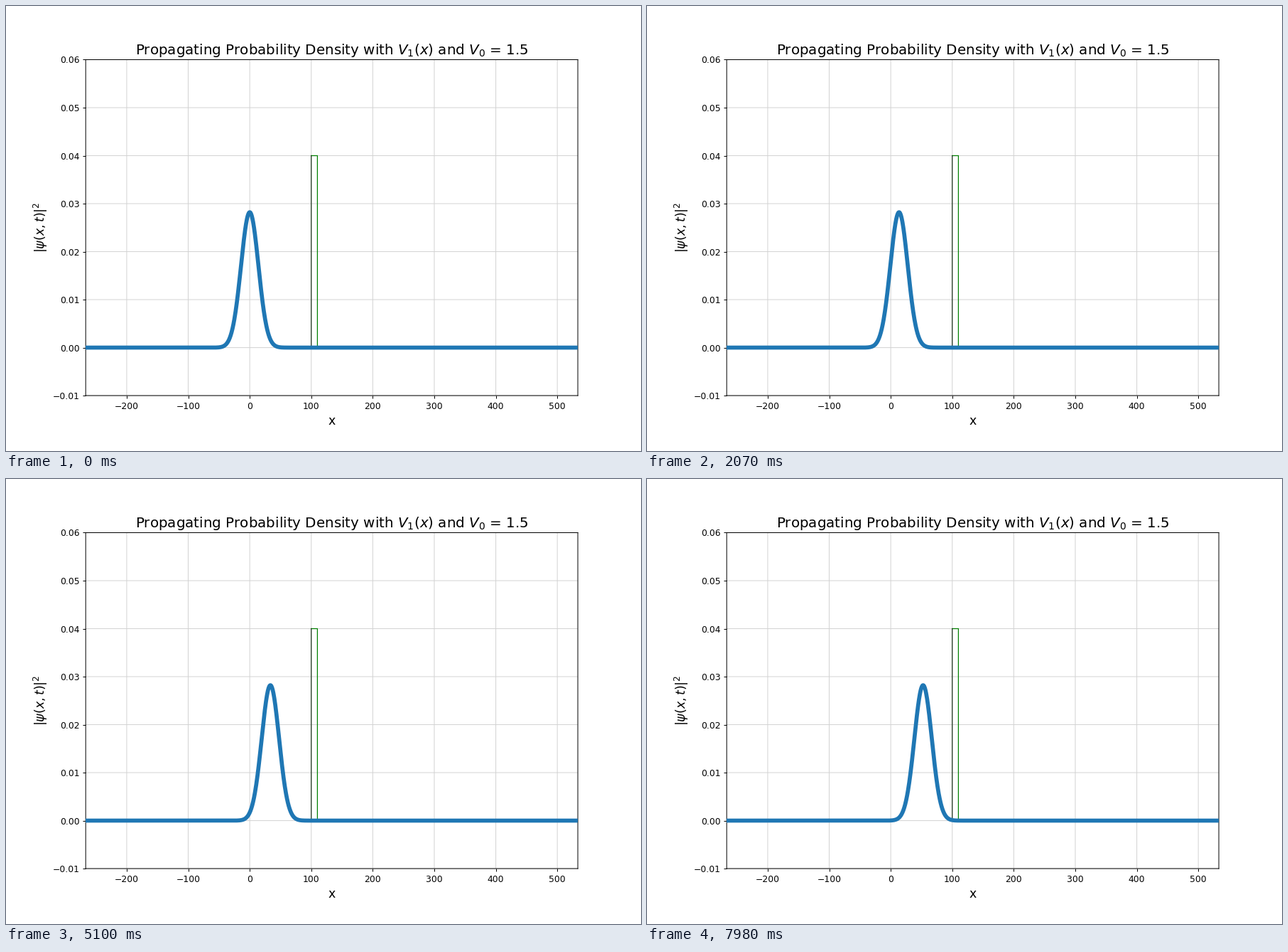
Animation of 894 by 626 pixels, one loop 8 s. Source, as a matplotlib script:

```python
import numpy as np
import matplotlib.pyplot as plt
from matplotlib.animation import FuncAnimation

WIDTH, HEIGHT, DPI = 894, 626, 89.4
LOOP, INTERVAL = 8000, 32      # ms
SPEED = 0.198 / 30             # x units per ms
SPREAD = 20                    # width of the wave packet
BARRIER = (100, 110)
BARRIER_TOP = 0.04

plt.rcParams["font.family"] = "DejaVu Sans"
plt.rcParams["path.snap"] = False
fig, ax = plt.subplots(figsize=(WIDTH / DPI, HEIGHT / DPI), dpi=DPI)
fig.subplots_adjust(left=0.1255, right=0.9005, bottom=0.1245, top=0.8794)

x = np.arange(-300, 560, 0.5)


def density(center):
    return np.exp(-((x - center) / SPREAD) ** 2) / (SPREAD * np.sqrt(np.pi))


ax.set_xlim(-800 / 3, 1600 / 3)
ax.set_ylim(-0.01, 0.06)
ax.grid(color="lightgray", linewidth=0.8)
ax.set_title("Propagating Probability Density with $V_1(x)$ and $V_0$ = 1.5",
             fontsize=16)
ax.set_xlabel("x", fontsize=14)
ax.set_ylabel(r"$|\psi(x,t)|^2$", fontsize=14)

left, right = BARRIER
ax.plot([left, right, right], [BARRIER_TOP, BARRIER_TOP, 0],
        color="green", linewidth=1)
ax.plot([left, left], [0, BARRIER_TOP], color="#1c331c", linewidth=1)

wave, = ax.plot(x, density(0), color="tab:blue", linewidth=4.6, zorder=3)


def update(i):
    wave.set_ydata(density(SPEED * INTERVAL * i))
    return wave,


anim = FuncAnimation(fig, update, frames=LOOP // INTERVAL,
                     interval=INTERVAL, repeat=True, repeat_delay=0)
plt.show()
```
